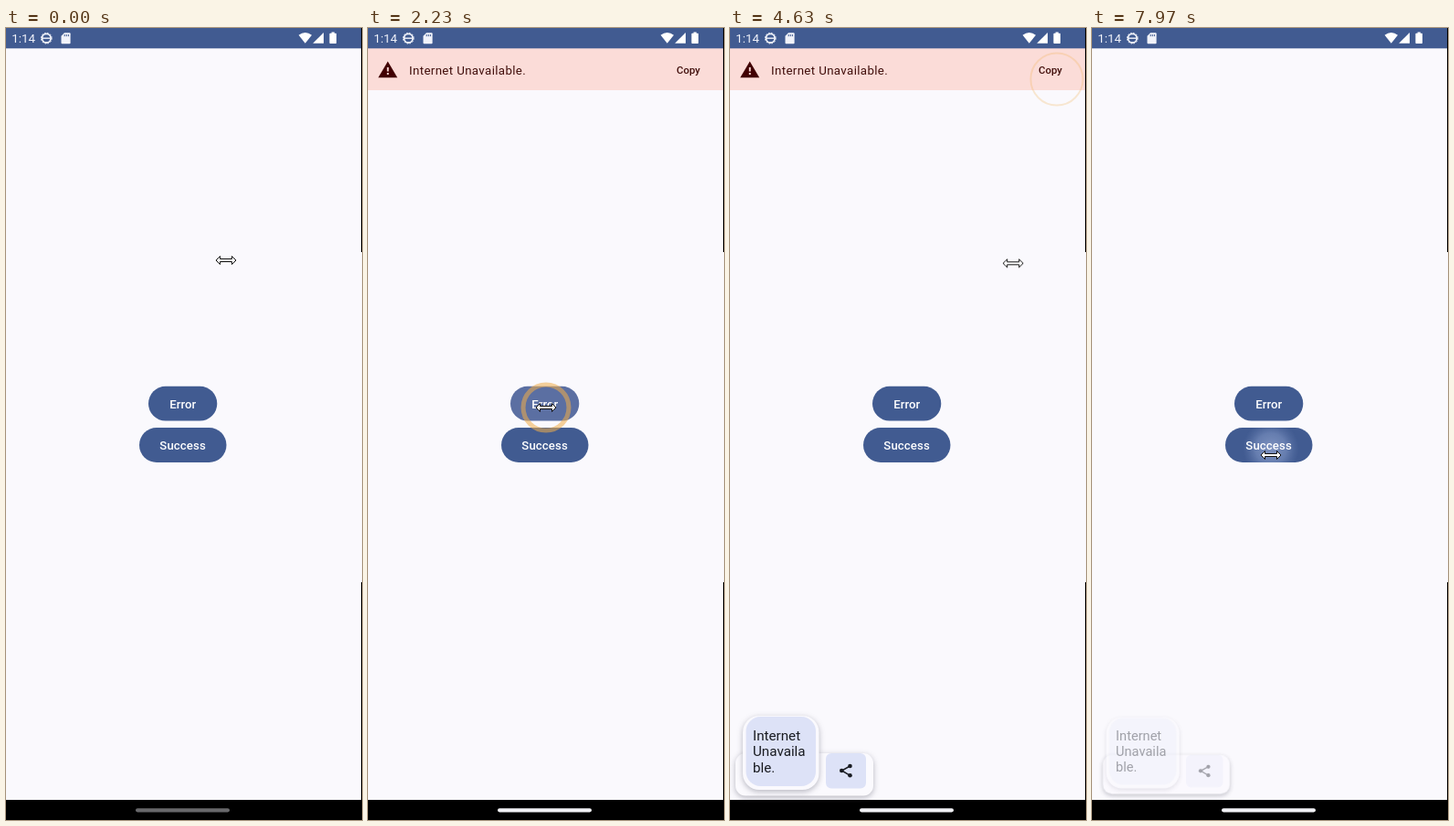
These frames come from a looping animation (390 px wide and 866 px high, 8000 ms). An HTML page:

```html
<!DOCTYPE html>
<html lang="en">
<head>
<meta charset="utf-8">
<title>Banner message</title>
<style>
  html, body { margin: 0; width: 100%; height: 100%; overflow: hidden; background: #000; }
  svg { display: block; width: 390px; height: 866px; }
  text { font-family: Roboto, "Noto Sans", sans-serif; }

  :root {
    --blue: #415b91;
    --paper: #faf9fd;
    --chip: #dde2f7;
    --ink: #410e0b;
    --spring: linear(0, .191, .475, .692, .829, .908, .952, .975, .988, .994, 1);
  }
  .label { font-size: 13.2px; font-weight: 500; letter-spacing: .1px; fill: #fff; text-anchor: middle; }

  /* every track shares one 8 s clock: 1% = 80 ms */
  .a { animation: 8s linear infinite; }

  .nav { animation-name: nav; }
  @keyframes nav {
    0%, 5% { fill: #68686b; }
    14%, 100% { fill: #f1f1f5; }
  }

  .banner { animation-name: banner; }
  @keyframes banner {
    0% { transform: translateY(-47px); }
    20.94% { transform: translateY(-47px); animation-timing-function: var(--spring); }
    25.94% { transform: none; }
    58.63% { transform: none; animation-timing-function: var(--spring); }
    63.63%, 100% { transform: translateY(-47px); }
  }

  .error { animation-name: press; }
  @keyframes press {
    0%, 19.6% { fill: #415b91; }
    20.8%, 21.7% { fill: #6b82b4; }
    27.9% { fill: #5b6fa2; }
    29.6%, 100% { fill: #415b91; }
  }

  .ripple { animation-name: ripple; transform-origin: 196px 460px; }
  @keyframes ripple {
    0%, 97.8% { transform: scale(.1); opacity: 0; }
    98.2% { opacity: .8; }
    99.6%, 100% { transform: none; opacity: 1; }
  }

  .ring { fill: none; stroke: #f0ad4a; animation-name: ring; }
  .ring.late { animation-delay: -5.7s; }
  @keyframes ring {
    0%, 19.99% { r: 3px; stroke-width: 2px; opacity: 0; }
    20% { r: 3px; stroke-width: 2px; opacity: .8; }
    21.6% { r: 10.5px; stroke-width: 2px; opacity: .75; }
    27.9% { r: 25px; stroke-width: 5px; opacity: .55; }
    29.1% { r: 28.5px; stroke-width: 2px; opacity: .26; }
    30%, 100% { r: 30px; stroke-width: 1px; opacity: 0; }
  }

  .tray, .card { animation-name: grow; }
  .tray { transform-origin: 80px 815px; --end: .92; }
  .card { transform-origin: 53px 791px; --end: .96; }
  @keyframes grow {
    0%, 53% { transform: scale(.92); }
    56.5%, 96.6% { transform: none; }
    99.6%, 100% { transform: scale(var(--end)); }
  }
  .fade { animation-name: fade; }
  @keyframes fade {
    0%, 53% { opacity: 0; }
    56%, 96.6% { opacity: 1; }
    99.6%, 100% { opacity: var(--left); }
  }
  .lift { filter: drop-shadow(0 2px 3px rgba(70, 70, 90, .38)); }
  .note { font-size: 15.2px; fill: #1a1c22; }

  .cursor { animation-name: cursor; }
  @keyframes cursor {
    0%, .4% { transform: translate(241px, 254px); }
    10.4% { transform: translate(238px, 262px); animation-timing-function: ease-in-out; }
    17.1%, 30% { transform: translate(195px, 415px); animation-timing-function: ease-in; }
    43.4% { transform: translate(379px, 115px); animation-timing-function: ease-out; }
    48%, 51.9% { transform: translate(358px, 56px); animation-timing-function: ease-in; }
    57.9% { transform: translate(310px, 258px); animation-timing-function: ease-out; }
    60.8%, 72% { transform: translate(301px, 291px); }
    82% { transform: translate(280px, 299px); animation-timing-function: ease-in-out; }
    92.1% { transform: translate(198px, 464px); }
    92.9%, 100% { transform: translate(196px, 467px); }
  }
</style>
</head>
<body>
<svg viewBox="0 0 390 866">
  <defs>
    <clipPath id="pill"><rect x="146" y="437" width="95.5" height="38" rx="19"/></clipPath>
    <radialGradient id="glow">
      <stop offset="0" stop-color="#7f93c0"/>
      <stop offset=".55" stop-color="#6c83b4" stop-opacity=".85"/>
      <stop offset="1" stop-color="#5a72a6" stop-opacity="0"/>
    </radialGradient>
  </defs>

  <rect width="390" height="866"/>
  <path d="M0 0H389V245H390V606H389V844H0Z" fill="var(--paper)"/>

  <!-- buttons -->
  <rect class="a error" x="156" y="391.8" width="75.3" height="37.8" rx="18.9"/>
  <text class="label" x="193.8" y="415.8">Error</text>
  <rect x="146" y="437" width="95.5" height="38" rx="19" fill="var(--blue)"/>
  <g clip-path="url(#pill)"><circle class="a ripple" cx="196" cy="460" r="31" fill="url(#glow)"/></g>
  <text class="label" x="193.6" y="461.3">Success</text>

  <!-- banner -->
  <g class="a banner">
    <rect y="22" width="389" height="46" fill="#fbdcd8"/>
    <path d="M21.7 36.6 32.2 54.2H11.2Z" fill="#410002"/>
    <path d="M20.8 43h1.9v4.4h-1.9zm0 6h1.9v1.9h-1.9z" fill="#fbdcd8"/>
    <text x="45" y="50.7" font-size="13.3" letter-spacing=".36" fill="var(--ink)">Internet Unavailable.</text>
    <text x="338" y="50" font-size="11.4" font-weight="500" fill="var(--ink)">Copy</text>
  </g>

  <!-- status bar -->
  <rect width="389" height="22.3" fill="var(--blue)"/>
  <text x="6.3" y="16" font-size="13.4" fill="#f1f3fa">1:14</text>
  <g fill="none" stroke="#f1f3fa">
    <circle cx="44.3" cy="11.2" r="4.8" stroke-width="1.8"/>
    <circle cx="44.3" cy="11.2" r="5.9" stroke-width="1" stroke-dasharray="1.6 1.49"/>
    <path d="M40 11.2h8.6" stroke-width="1.4"/>
  </g>
  <path d="M64 5.3h5.6q1 0 1 1v10q0 1-1 1h-8.1q-1 0-1-1V8.8Z" fill="#f1f3fa"/>
  <path d="M64.2 7v2.2M66.3 7v2.2M68.4 7v2.2" stroke="#415b91"/>
  <g fill="#fff">
    <path d="M320.6 7.7q7.2-5.4 14.4 0L327.8 16.8Z"/>
    <path d="M348 5v11.8h-11.8Z"/>
    <path d="M356.6 4.6h3.2v1.2h1.4q.8 0 .8.8v9.7q0 .8-.8.8h-6q-.8 0-.8-.8V6.6q0-.8.8-.8h1.4Z"/>
  </g>

  <!-- copied text preview -->
  <g class="a tray">
    <g class="a fade" style="--left:.85">
      <rect class="lift" x="6" y="793" width="151" height="46.5" rx="11" fill="#fbfafe"/>
    </g>
    <rect class="a fade" style="--left:.25" x="105" y="793" width="44" height="38.5" rx="6" fill="var(--chip)"/>
    <g class="a fade" style="--left:.38" fill="#1a1c22">
      <path d="M131.5 807 122.5 812 131.5 817.3" fill="none" stroke="#1a1c22" stroke-width="1.5"/>
      <circle cx="131.5" cy="807" r="2.3"/>
      <circle cx="122.3" cy="812" r="2.3"/>
      <circle cx="131.5" cy="817.2" r="2.3"/>
    </g>
  </g>
  <g class="a card">
    <g class="a fade" style="--left:.35">
      <rect class="lift" x="14" y="752" width="83.5" height="81" rx="18" fill="var(--paper)"/>
    </g>
    <rect class="a fade" style="--left:.2" x="17.5" y="753" width="76.5" height="76" rx="16" fill="var(--chip)"/>
    <text class="a fade note" style="--left:.38">
      <tspan x="25" y="778.5">Internet</tspan>
      <tspan x="25" y="796">Unavaila</tspan>
      <tspan x="25" y="813.5">ble.</tspan>
    </text>
  </g>

  <rect class="a nav" x="142" y="853.2" width="103" height="4.2" rx="2.1"/>

  <!-- pointer -->
  <circle class="a ring" cx="195" cy="415"/>
  <circle class="a ring late" cx="358" cy="56"/>
  <path class="a cursor" d="M-11 0-6.5-4.5V-1.5H6.5V-4.5L11 0 6.5 4.5V1.5H-6.5V4.5Z" fill="#fff" stroke="#111" stroke-width="1"/>
</svg>
</body>
</html>
```
